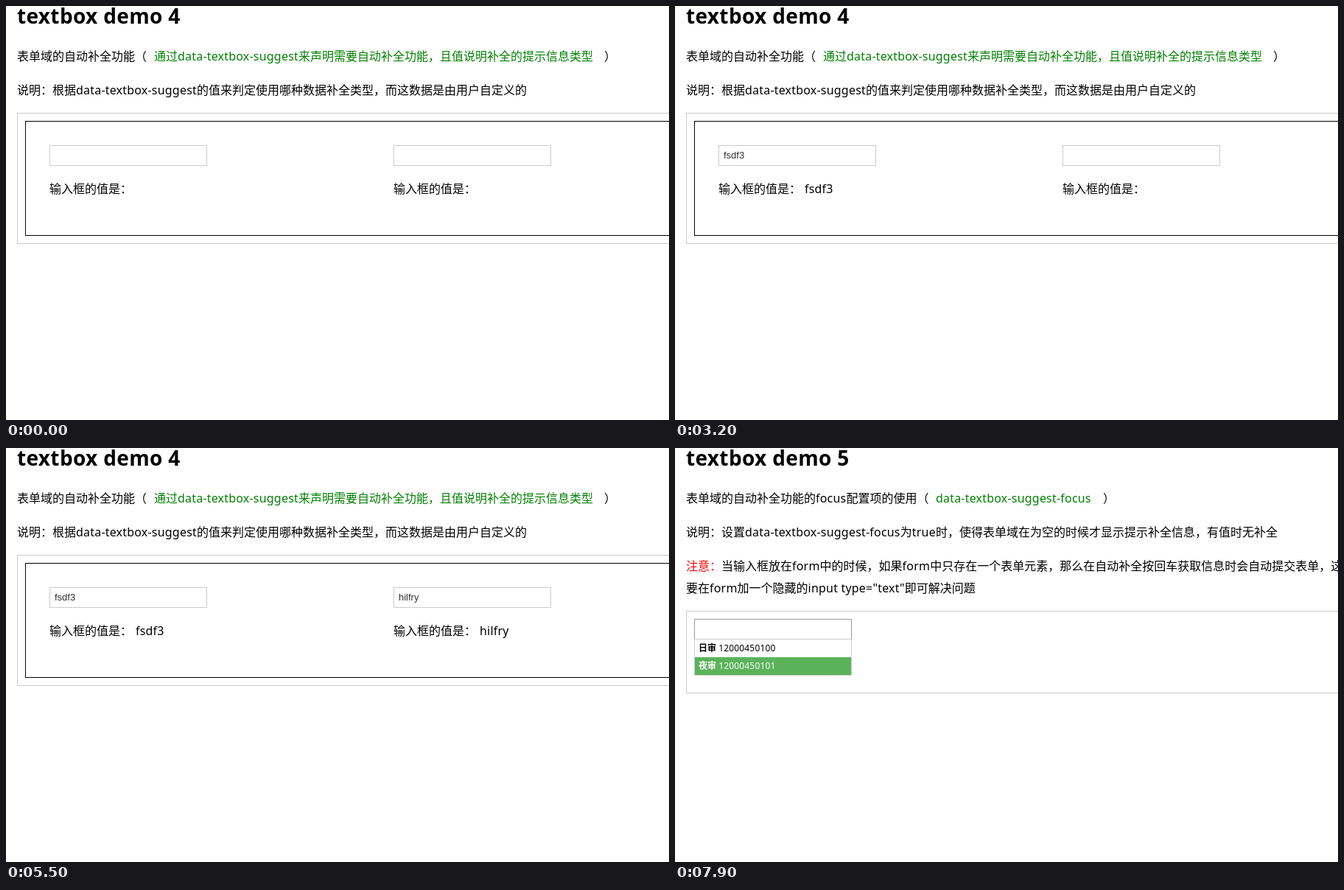
Write an HTML page that moves like this. It is 900 px wide and 562 px high and loops after 8000 ms.

```html
<!DOCTYPE html>
<html lang="zh-CN">
<head>
<meta charset="utf-8">
<title>textbox demo</title>
<style>
  html, body { margin: 0; width: 100%; height: 100%; overflow: hidden; background: #fff; }
  svg { position: absolute; left: 0; top: 0; width: 900px; height: 562px; overflow: hidden; }
  text { font: 16px "Noto Sans", "Noto Sans CJK SC", "Noto Sans CJK", sans-serif; fill: #000; }
  .latin { letter-spacing: .0125em; }
  .title { font-size: 28px; font-weight: 700; }
  .item { font-size: 12px; }
  .bold { font-weight: 700; }
  .typed { font: 13px "Liberation Sans", Arial, sans-serif; fill: #333; }
  .typed .latin { letter-spacing: 0; }
  .green { fill: #008000; }
  .red { fill: #f00; }
  .white { fill: #fff; }
</style>
</head>
<body>
<svg id="stage" viewBox="0 0 900 562" lang="zh-CN"></svg>
<script>
const LOOP = 8000;
const stage = document.getElementById('stage');
const pen = document.createElement('canvas').getContext('2d');

const fields = {
  left: { x: 59, y: 189, page: 4 },
  right: { x: 526, y: 189, page: 4 },
  single: { x: 26, y: 232, page: 5 },
};

const numbered = word => [1, 2, 3].map(n => ['', word + n]);
const people = [['zoven', ''], ['', 'hilfry']];
const shifts = [['日审', ' 12000450100'], ['夜审', ' 12000450101']];
const idle = { hot: false, caret: false, text: '', value: '', list: null, pick: 0 };
const typing = text => ({ text, list: numbered(text) });

// Each step: time, field, what changes in it.
const steps = [
  [700, 'left', { hot: true }],
  [900, 'left', { caret: true }],
  [1300, 'left', { text: 'f' }],
  [1400, 'left', typing('fs')],
  [1500, 'left', typing('fsd')],
  [1600, 'left', typing('fsdf')],
  [2000, 'left', { pick: 2 }],
  [2300, 'left', { text: 'fsdf3', value: 'fsdf3', list: null }],
  [2400, 'left', { hot: false, caret: false }],
  [2800, 'right', { hot: true }],
  [3200, 'right', { hot: false }],
  [3400, 'right', { hot: true }],
  [3600, 'right', { caret: true }],
  [4100, 'right', { text: 'f' }],
  [4200, 'right', { list: people }],
  [4300, 'right', { text: 'fd' }],
  [4400, 'right', { text: 'fds' }],
  [4900, 'right', { caret: false }],
  [5100, 'right', { caret: true, pick: 1 }],
  [5400, 'right', { text: 'hilfry', value: 'hilfry', list: null }],
  [5500, 'right', { hot: false, caret: false }],
  [6700, 'single', {}],
  [7200, 'single', { hot: true }],
  [7400, 'single', { caret: true }],
  [7500, 'single', { list: shifts }],
  [7700, 'single', { pick: 1 }],
  [7900, 'single', { caret: false }],
];

const span = (s, cls) => `<tspan class="${cls}">${s}</tspan>`;
const mark = s => s.replace(/[\x20-\x7e]+/g, run => span(run, 'latin'));
const text = (x, y, s, cls = '') => `<text x="${x}" y="${y}" class="${cls}">${mark(s)}</text>`;
const rect = (x, y, w, h, fill) =>
  `<rect x="${x}" y="${y}" width="${w}" height="${h}" fill="${fill}"/>`;
const box = (x, y, w, h, line) =>
  rect(x, y, w, h, line) + rect(x + 1, y + 1, w - 2, h - 2, '#fff');

function menu(x, y, list, pick) {
  let out = box(x, y, 214, list.length * 24 + 2, '#ccc');
  list.forEach(([strong, plain], i) => {
    const top = y + 1 + i * 24;
    if (i === pick) out += rect(x + 1, top, 212, 24, '#5ab35a');
    out += `<text x="${x + 6}" y="${top + 16}" class="item${i === pick ? ' white' : ''}">` +
      (strong && span(mark(strong), 'bold')) + mark(plain) + '</text>';
  });
  return out;
}

function field({ x, y }, s) {
  let out = box(x, y, 214, 28, s.hot ? '#999' : '#ccc');
  out += text(x, y + 65, '输入框的值是：') + text(x + 117, y + 65, s.value);
  out += text(x + 7, y + 18, s.text, 'typed');
  if (s.caret) {
    pen.font = '13px "Liberation Sans", Arial, sans-serif';
    const cx = x + 7 + Math.floor(pen.measureText(s.text).width);
    out += s.text ? rect(cx, y + 6, 1, 15, '#000') : rect(cx, y + 5, 1, 18, '#000');
  }
  return out + (s.list ? menu(x, y + 27, s.list, s.pick) : '');
}

const pages = {
  4: text(15, 24, 'textbox demo 4', 'title') +
    text(15, 74, '表单域的自动补全功能（') +
    text(201, 74, '通过data-textbox-suggest来声明需要自动补全功能，且值说明补全的提示信息类型', 'green') +
    text(812, 74, '）') +
    text(15, 120, '说明：根据data-textbox-suggest的值来判定使用哪种数据补全类型，而这数据是由用户自定义的') +
    box(15, 145, 1000, 178, '#ccc') + box(26, 156, 980, 156, '#000'),
  5: text(15, 24, 'textbox demo 5', 'title') +
    text(15, 74, '表单域的自动补全功能的focus配置项的使用（') +
    text(354, 74, 'data-textbox-suggest-focus', 'green') +
    text(581, 74, '）') +
    text(15, 120, '说明：设置data-textbox-suggest-focus为true时，使得表单域在为空的时候才显示提示补全信息，有值时无补全') +
    text(15, 166, '注意：', 'red') +
    text(63, 166, '当输入框放在form中的时候，如果form中只存在一个表单元素，那么在自动补全按回车获取信息时会自动提交表单，这') +
    text(15, 196, '要在form加一个隐藏的input type="text"即可解决问题') +
    box(15, 221, 1000, 112, '#ccc'),
};

function draw(count) {
  const state = {};
  for (const name in fields) state[name] = { ...idle };
  let page = 4;
  for (const [, name, change] of steps.slice(0, count)) {
    Object.assign(state[name], change);
    page = fields[name].page;
  }
  stage.innerHTML = pages[page] + Object.keys(fields)
    .filter(name => fields[name].page === page)
    .map(name => field(fields[name], state[name])).join('');
}

let shown = -1;
const start = performance.now();
function tick() {
  const t = (performance.now() - start) % LOOP;
  const count = steps.filter(step => step[0] <= t).length;
  if (count !== shown) draw(shown = count);
  requestAnimationFrame(tick);
}
tick();
</script>
</body>
</html>
```
